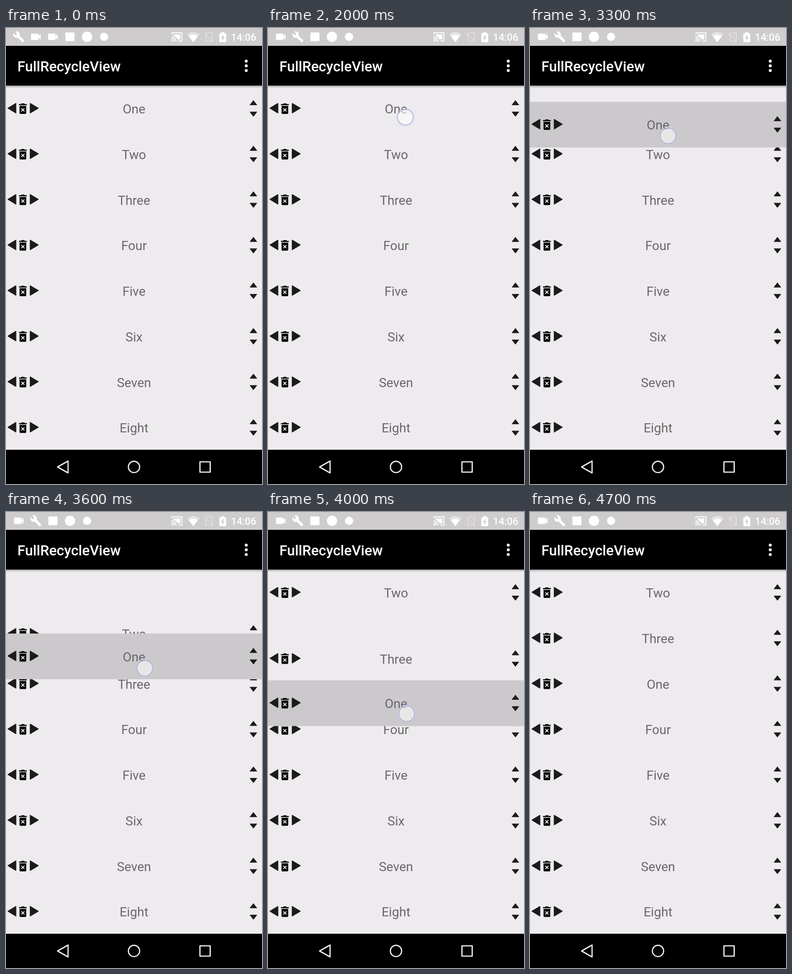
An HTML page for the animation above (5.1 s loop, 561 by 998 pixels).

```html
<!DOCTYPE html>
<html lang="en">
<head>
<meta charset="utf-8">
<title>FullRecycleView</title>
<style>
  html, body { margin: 0; width: 100%; height: 100%; overflow: hidden; background: #000; }
  svg { display: block; width: 100vw; height: 100vh; }
  text { font-family: Roboto, "Noto Sans", sans-serif; }
  .label { font-size: 28.05px; fill: #696769; text-anchor: middle; }
</style>
</head>
<body>
<svg viewBox="0 0 561 998">
  <defs>
    <linearGradient id="shade" x1="0" y1="0" x2="0" y2="1">
      <stop offset="0" stop-color="#000" stop-opacity=".32"/>
      <stop offset=".5" stop-color="#000" stop-opacity=".12"/>
      <stop offset="1" stop-color="#000" stop-opacity="0"/>
    </linearGradient>
    <path id="camera" d="M17 10.5V7c0-.55-.45-1-1-1H4c-.55 0-1 .45-1 1v10c0 .55.45 1 1 1h12c.55 0 1-.45 1-1v-3.5l4 4v-11z" transform="scale(1.17) translate(-12 -12)"/>
    <path id="wrench" d="M22.7 19l-9.1-9.1c.9-2.3.4-5-1.5-6.9-2-2-5-2.4-7.4-1.3L9 6 6 9 1.6 4.7C.4 7.1.9 10.1 2.9 12.1c1.9 1.9 4.6 2.4 6.9 1.5l9.1 9.1c.4.4 1 .4 1.4 0l2.3-2.3c.5-.4.5-1.1.1-1.4z" transform="scale(1.1) translate(-12 -12)"/>
    <rect id="square" x="-10" y="-9.5" width="20" height="19"/>
    <circle id="disc" r="11.3"/>
    <circle id="dot" r="9"/>
    <g id="tools" fill="#1c1b1c" stroke="#1c1b1c" stroke-width="1.6" stroke-linejoin="round">
      <path d="M4.3 175.5L21.7 165v21zM70.7 175.5L53 165v21z"/>
      <path d="M534.6 168.4h15.2L542.2 158.600zM534.600 183.700h15.200L542.200 193.500z" stroke-width="1"/>
      <g fill="#000" stroke="none">
        <path d="M28.500 166.500h4.300l1.400-1.500h5.600l1.400 1.500h4.300v2.500h-17z"/>
        <path d="M29.700 170.500h14.600v14.900q0 2.600-2.600 2.600h-9.400q-2.600 0-2.600-2.600z"/>
        <path d="M33.700 176l6.600 6.600m0-6.600l-6.600 6.600" stroke="#eee" stroke-width="2"/>
      </g>
    </g>
  </defs>

  <rect y="126" width="561" height="797" fill="#eeebee"/>
  <g id="list"></g>
  <rect y="126" width="561" height="6" fill="url(#shade)"/>

  <g id="touch">
    <circle r="18.500" fill="none" stroke="#c3c9ea" stroke-opacity=".35" stroke-width="4"/>
    <circle r="17" fill="#fff" fill-opacity=".57" stroke="#9da5d2" stroke-opacity=".8" stroke-width="1.500"/>
  </g>

  <rect y="39" width="561" height="87"/>
  <text x="24.900" y="95" font-size="31.170" font-weight="500" fill="#fff">FullRecycleView</text>
  <g fill="#fff">
    <circle cx="526.500" cy="72.500" r="3.200"/>
    <circle cx="526.500" cy="82.800" r="3.200"/>
    <circle cx="526.500" cy="93.100" r="3.200"/>
  </g>

  <rect width="561" height="39" fill="#cfccce"/>
  <g id="notes" fill="#fff"></g>
  <g fill="#fff">
    <g fill="none" stroke="#fff" stroke-width="2">
      <path d="M363.500 14.500v-4h22v18h-8"/>
      <path d="M362.500 19.500a10 10 0 0 1 10 10M362.500 23.500a6 6 0 0 1 6 6"/>
    </g>
    <path d="M362.500 26.300a3.300 3.300 0 0 1 3.300 3.300h-3.300z"/>
    <path d="M367 14h15v11h-6q-2-5.500-9-7.500z"/>
    <path d="M410.500 31L397 13.500q13.500-9 27 0z" opacity=".45"/>
    <path d="M410.500 31L400.500 18q10-6.500 20 0z"/>
    <g fill="none" stroke="#fff" stroke-width="1.700" opacity=".4">
      <path d="M438 14l5-4h9v19h-14z"/>
      <path d="M435 11l18 19"/>
    </g>
    <path fill-rule="evenodd" d="M472 9h6v2.500h2.500q2 0 2 2v15.500q0 2-2 2h-11q-2 0-2-2v-15.500q0-2 2-2h2.500zM477 14l-6.300 8h3.600l-1.300 6.500 6.300-8h-3.600z"/>
    <text x="493" y="27.500" font-size="21.800" font-weight="500">14:06</text>
  </g>

  <rect y="923" width="561" height="75"/>
  <g fill="none" stroke="#f0eef0" stroke-width="2.700" stroke-linejoin="round">
    <path d="M113 960.700l23-13v26z"/>
    <circle cx="280.500" cy="960.700" r="12.300"/>
    <rect x="425" y="949.500" width="22.500" height="22.500"/>
  </g>
</svg>
<script>
const LOOP = 5100, STEP = 100, PITCH = 99.75;
const DRAG_START = 3200, LIFT = 2800, RELEASE = 4401, SETTLED = 4700;
const drag = [8, 35, 70, 105, 139.5, 170, 198, 222, 242, 258, 271, 281, 286.5];
const names = ["One", "Two", "Three", "Four", "Five", "Six", "Seven", "Eight"];
const $ = id => document.getElementById(id);
const place = (el, x, y) => el.setAttribute("transform", `translate(${x} ${y})`);
const show = (el, on) => el.setAttribute("visibility", on ? "visible" : "hidden");

// The first row is appended last so that it floats above the others.
const rows = names.map(name => {
  const g = document.createElementNS("http://www.w3.org/2000/svg", "g");
  g.innerHTML = `<rect y="126.500" width="561" height="100" fill="#cbc9cb"/>
    <text class="label" x="280.500" y="187">${name}</text><use href="#tools"/>`;
  show(g.firstChild, false);
  return g;
});
$("list").append(...rows.slice(1), rows[0]);

const icons = (...ids) => ids.map((id, i) =>
  `<use href="#${id}" x="${28 + 37.4 * i}" y="19.300"/>`).join("");
const notes = [
  icons("wrench", "camera", "camera", "square", "disc", "dot"),
  icons("camera", "wrench", "square", "disc", "dot")
];
let noteState = -1;

// Accelerate, then decelerate, over 250 ms.
function ease(t, start) {
  const p = Math.min(1, Math.max(0, (t - start) / 250));
  return (1 - Math.cos(p * Math.PI)) / 2;
}

function dragAt(t) {
  const i = Math.round((t - DRAG_START) / STEP);
  return i < 0 ? 0 : drag[Math.min(i, drag.length - 1)];
}

function render(time) {
  const t = Math.floor(time / STEP) * STEP;

  const state = t < 100 ? 0 : 1;
  if (state !== noteState) $("notes").innerHTML = notes[noteState = state];

  const held = dragAt(t);
  const offset = held + (2 * PITCH - held) * ease(t, RELEASE);
  const slots = names.map((_, i) => i * PITCH);
  slots[0] = offset;
  slots[1] -= PITCH * ease(t, 3549);
  slots[2] -= PITCH * ease(t, 3867);
  rows.forEach((row, i) => place(row, 0, slots[i]));
  show(rows[0].firstChild, t >= LIFT && t < SETTLED);

  // The finger runs slightly ahead of the row it drags.
  const lead = (held - dragAt(t - STEP)) * 0.22;
  const sway = 3.5 * Math.sin(Math.PI * Math.min(1, Math.max(0, (t - 3100) / 1300)));
  place($("touch"), 301 + sway, 195 + held + lead - (t >= 4400 ? 2 : 0));
  show($("touch"), t >= 2000 && t < 4500);
}

const begin = performance.now();
function tick() {
  render((performance.now() - begin) % LOOP);
  requestAnimationFrame(tick);
}
tick();
</script>
</body>
</html>
```
